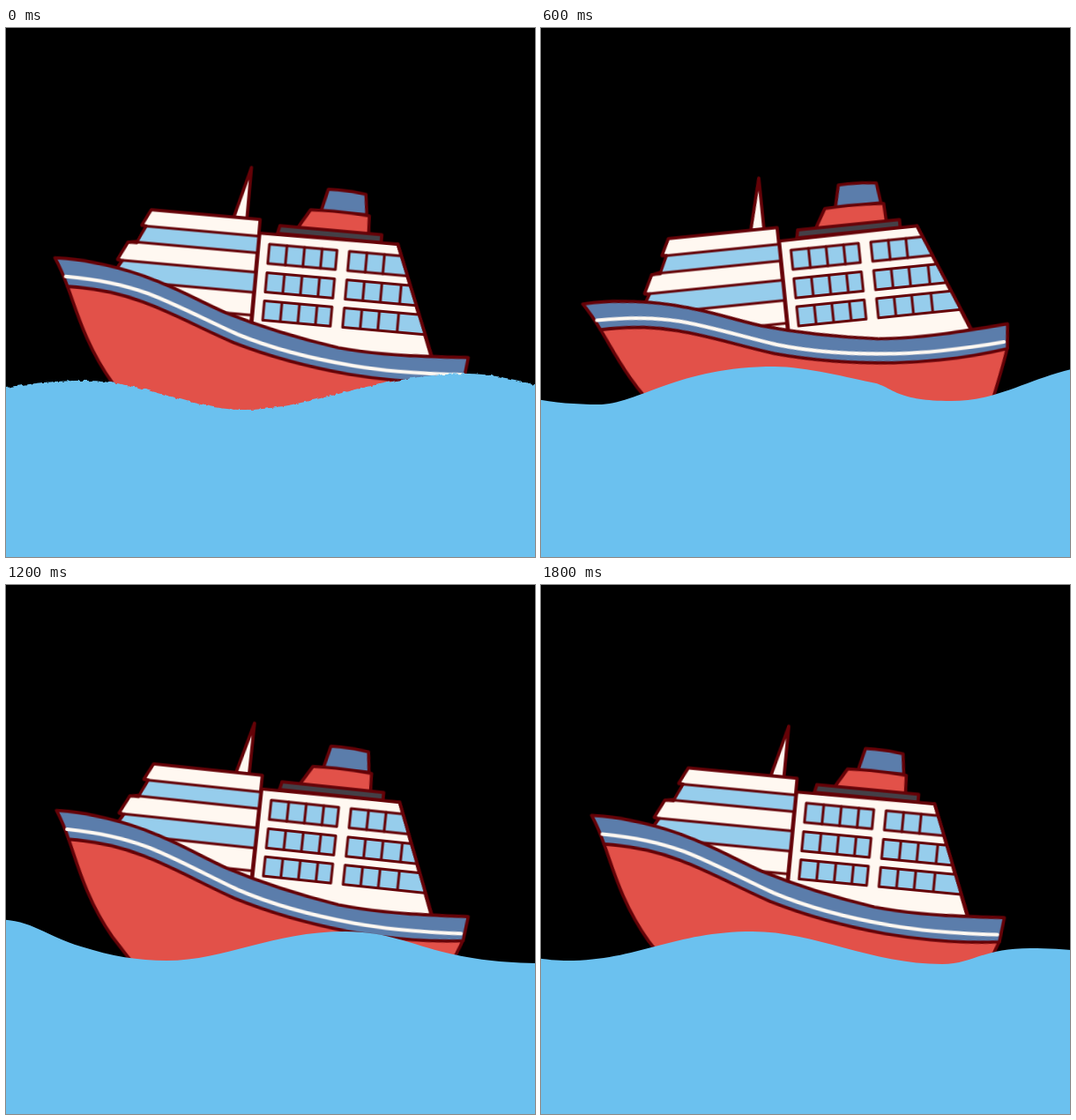
An HTML page without scripts that plays this animation: 600 by 600 pixels, repeating every 2100 ms.

```html
<!DOCTYPE html>
<html lang="en">
<head>
<meta charset="utf-8">
<title>Ship on the waves</title>
<style>
  html, body { margin: 0; width: 100%; height: 100%; overflow: hidden; background: #000; }
  svg { display: block; width: 100%; height: 100%; }

  .ship, .sea { animation: 2.1s steps(1) infinite; }
  .ship {
    animation-name: rock;
    transform-origin: 289.5px 321.5px;
    stroke: #650207; stroke-width: 3.6; stroke-linejoin: round; stroke-linecap: round;
  }
  .sea { animation-name: roll; fill: #6bc1ef; }
  .white { fill: #fff8f1; }
  .glass { fill: #96cdec; }
  .red { fill: #e25149; }
  .navy { fill: #5b7dab; }
  .dark { fill: #444047; }
  .line { fill: none; }
  .thin { stroke-width: 3; }
  .stripe { fill: none; stroke: #fff8f1; stroke-width: 4; }

  @keyframes rock {
    0%      { transform: translate(.4px, -4.3px) rotate(5.1deg); }
    14.285% { transform: none; }
    28.571% { transform: translate(-1.2px, 2.8px) rotate(-5.8deg); }
    42.857% { transform: none; }
    57.142% { transform: translate(1.3px, -5.6px) rotate(6deg); }
    71.428% { transform: translate(2px, 1px) rotate(7.4deg); }
    85.714%, 100% { transform: translate(2px, -2.2px) rotate(5.45deg); }
  }

  @keyframes roll {
    0% {
      filter: url(#rough);
      d: path("M-10 410C30 402 60 400 88 400C160 400 205 433 270 433C345 433 420 392 525 392C560 393 590 402 610 408V610H-10Z");
    }
    14.285% {
      filter: none;
      d: path("M-10 390C60 387 95 426 165 426C235 426 290 388 395 388C465 388 500 423 565 423C580 423 595 421 610 418V610H-10Z");
    }
    28.571% {
      filter: none;
      d: path("M-10 420C15 425 40 427 65 427C110 427 155 384 265 384C300 384 350 397 380 403C400 409 405 423 465 423C520 423 550 398 610 385V610H-10Z");
    }
    42.857% {
      filter: none;
      d: path("M-10 408C15 395 60 388 95 388C190 388 220 429 318 429C400 429 440 398 515 398C550 399 580 405 610 411V610H-10Z");
    }
    57.142% {
      filter: none;
      d: path("M-10 379C30 380 45 398 85 410C120 421 150 426 182 426C250 426 300 393 385 393C460 393 480 429 610 429V610H-10Z");
    }
    71.428% {
      filter: none;
      d: path("M-10 406C20 418 60 426 90 426C170 426 215 393 303 393C385 393 430 429 515 429C545 429 560 414 610 412V610H-10Z");
    }
    85.714%, 100% {
      filter: none;
      d: path("M-10 422C5 425 20 426 30 426C110 426 150 393 240 393C310 393 375 430 455 430C490 430 500 412 555 412C575 412 595 413 610 415V610H-10Z");
    }
  }
</style>
</head>
<body>
<svg viewBox="0 0 600 600">
  <defs>
    <filter id="rough" filterUnits="userSpaceOnUse" x="-10" y="370" width="620" height="240" color-interpolation-filters="sRGB">
      <feTurbulence type="fractalNoise" baseFrequency=".16" numOctaves="2" seed="4"/>
      <feDisplacementMap in="SourceGraphic" scale="4.5" xChannelSelector="R" yChannelSelector="G"/>
    </filter>
    <g id="panes" class="thin">
      <path class="glass" d="M292 249H369V271H292Z"/>
      <path class="line" d="M312 249V271M332 249V271M352 249V271M403 249V271M423 249V271"/>
    </g>
  </defs>

  <rect width="600" height="600"/>

  <g class="ship">
    <!-- mast and funnel -->
    <path class="white" d="M264 164L249 222H264Z"/>
    <path class="navy" d="M353 181Q375 180 396 183L399 206H347Z"/>
    <path class="red" d="M335 206Q368 204 402 207L403 228H322Z"/>
    <path class="dark" d="M302 227H418V236H300Z"/>

    <!-- front decks -->
    <path class="white" d="M155 222H279V350L120 295L127 283L122 281L132 261L143 259L151 241L146 240Z"/>
    <g class="thin">
      <path class="glass" d="M151 241H279V260H142Z"/>
      <path class="glass" d="M128 282H279V305H170L122 292Z"/>
      <path class="line" d="M146 241H151M132 261H142M122 282H128M250 331H278"/>
    </g>

    <!-- cabin block -->
    <path class="white" d="M280 237.500L437 236L487 362H280Z"/>
    <g class="thin">
      <path class="glass" d="M383 249H442L451 271H383Z"/>
      <path class="glass" d="M383 281.500H455L464 303.500H383Z"/>
      <path class="glass" d="M383 313.500H468L477 335.500H383Z"/>
      <path class="line" d="M445 282V303M445 314V335"/>
    </g>
    <use href="#panes"/>
    <use href="#panes" y="32.5"/>
    <use href="#panes" y="64.5"/>
    <path class="line" d="M437 236L487 360"/>

    <!-- hull -->
    <path class="red" d="M68 317C78 337 94 382 129 422L151 445L180 470H490C503 440 518 405 525 384L400 375L262 350L155 315Z"/>
    <path class="navy" d="M51 286C85 284 133 291 165 301C195 309 220 321 250 331C300 346 345 354 380 359C430 364 485 360 528 357L525 385C480 391 435 391 395 388C350 384 300 375 262 364C220 350 192 337 155 327C130 320 100 316 68 317C63 306 57 295 51 286Z"/>
    <path class="stripe" d="M65 306C100 306 130 309 160 317C195 327 230 342 265 354C300 365 350 374 400 378C440 381 480 380 522 377"/>
  </g>

  <path class="sea"/>
</svg>
</body>
</html>
```
